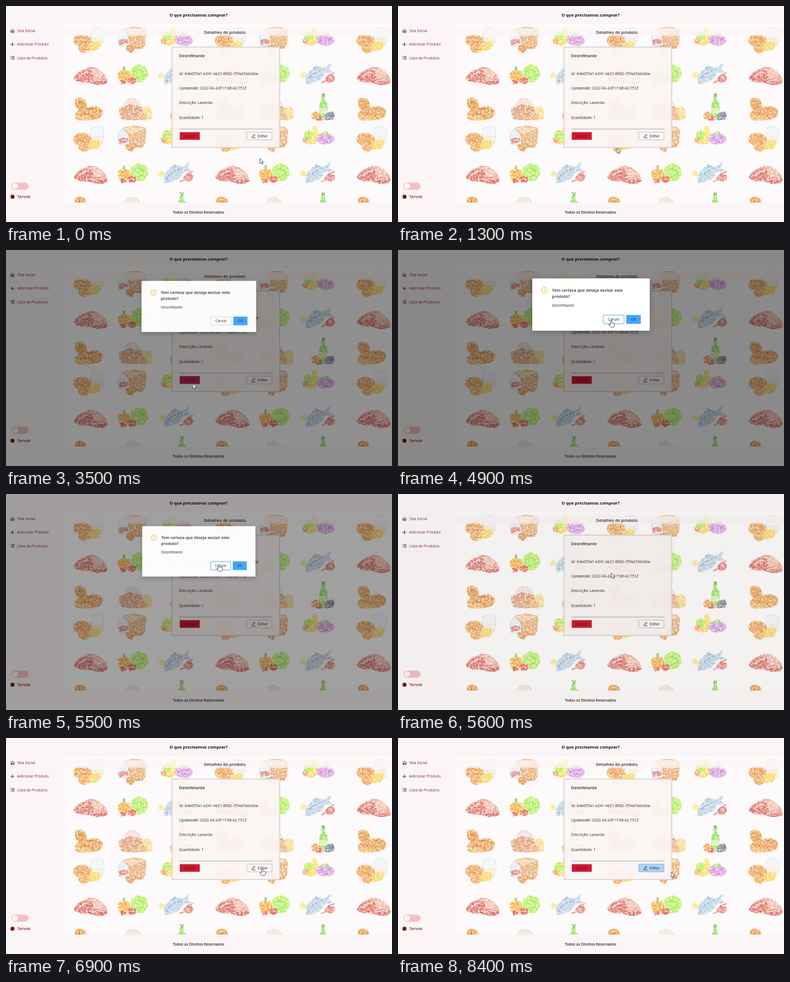
An HTML page that plays this animation: 690 by 388 pixels, repeating every 8500 ms.

```html
<!DOCTYPE html>
<html lang="pt">
<head>
<meta charset="utf-8">
<title>O que precisamos comprar?</title>
<style>
html, body { margin: 0; width: 100%; height: 100%; overflow: hidden; background: #fbf5f5; }
svg { display: block; width: 100vw; height: 100vh; }
text { font: 6.7px "Open Sans", "Noto Sans", sans-serif; fill: #2b2829; }
.semi { font-weight: 600; }
.title { font-size: 7.5px; }
.small { font-size: 6.6px; }
.side text { fill: #84283a; }
.line { fill: none; stroke: #222; stroke-width: .9; }

.cursor { animation: move 8.5s infinite; }
.arrow { animation: arrow 8.5s step-end infinite; }
.hand { animation: hand 8.5s step-end infinite; }
.beam { animation: beam 8.5s step-end infinite; }
.delete { animation: delete 8.5s linear infinite; }
.delete-text { animation: delete-text 8.5s linear infinite; }
.edit { animation: edit 8.5s linear infinite; }
.shade { animation: shade 8.5s step-end infinite; }
.modal { animation: modal 8.5s step-end infinite; transform-origin: 334px 237px; }
.cancel { animation: cancel 8.5s linear infinite; }
.flash { animation: flash 8.5s linear infinite; }

/* pointer: one step per 100 ms */
@keyframes move {
  0% { transform: translate(454px, 274px); animation-timing-function: step-end; }
  1.17% { transform: translate(454px, 274px); animation-timing-function: steps(5); }
  7.05% { transform: translate(430px, 266px); animation-timing-function: step-end; }
  9.41% { transform: translate(430px, 266px); animation-timing-function: steps(12); }
  23.52% { transform: translate(337px, 240px); animation-timing-function: step-end; }
  38.82%, 42.35% { transform: translate(334px, 240px); animation-timing-function: steps(7); }
  50.58% { transform: translate(381px, 127px); animation-timing-function: step-end; }
  65.88% { transform: translate(381px, 142px); animation-timing-function: step-end; }
  67.05% { transform: translate(380px, 163px); animation-timing-function: steps(12); }
  81.17% { transform: translate(458px, 235px); animation-timing-function: step-end; }
  96.47% { transform: translate(466px, 237px); animation-timing-function: step-end; }
  97.64% { transform: translate(478px, 240px); animation-timing-function: step-end; }
  98.82%, 100% { transform: translate(488.5px, 241px); animation-timing-function: step-end; }
}
@keyframes arrow {
  0%, 41.17%, 65.88%, 71.76%, 97.64%, 100% { opacity: 1; }
  23.52%, 50.58%, 67.05%, 81.17% { opacity: 0; }
}
@keyframes hand {
  0%, 41.17%, 65.88%, 97.64%, 100% { opacity: 0; }
  23.52%, 50.58%, 81.17% { opacity: 1; }
}
@keyframes beam {
  0%, 71.76%, 100% { opacity: 0; }
  67.05% { opacity: 1; }
}
@keyframes delete {
  0%, 23.52% { fill: #d0182f; stroke: #cdb4ba; }
  27.05%, 38.82% { fill: #6685c9; stroke: #5c9ad8; animation-timing-function: step-end; }
  41.17% { fill: #b8235a; stroke: #b8a2a8; animation-timing-function: step-end; }
  42.35%, 100% { fill: #d0182f; stroke: #cdb4ba; }
}
@keyframes delete-text {
  0%, 23.52%, 42.35%, 100% { fill: #680c1c; }
  27.05%, 38.82% { fill: #1e2438; }
}
@keyframes edit {
  0%, 81.17% { fill: #fbf7f7; stroke: #c4c1c6; }
  84.7%, 99.9% { fill: #acd3f6; stroke: #8fbbe4; }
  100% { fill: #fbf7f7; stroke: #c4c1c6; }
}
@keyframes shade {
  0%, 67.05%, 100% { opacity: 0; }
  41.17% { opacity: .43; }
  42.35% { opacity: .45; }
  64.7% { opacity: .36; }
  65.88% { opacity: .04; }
}
@keyframes modal {
  0%, 65.88%, 100% { opacity: 0; transform: none; }
  41.17% { opacity: .97; transform: scale(.976); }
  42.35% { opacity: 1; transform: none; }
  64.7% { opacity: .97; transform: scale(.964); }
}
@keyframes cancel {
  0%, 50.58% { stroke: #d9d9d9; }
  52.94%, 100% { stroke: #4a9fd0; }
}
@keyframes flash {
  0%, 65.87% { opacity: 0; }
  65.88%, 67.05% { opacity: .75; }
  74.11%, 100% { opacity: 0; }
}
</style>
</head>
<body>
<svg viewBox="0 0 690 388" preserveAspectRatio="none">
<defs>
  <clipPath id="page"><rect x="101" y="32" width="589" height="320.5"/></clipPath>
  <pattern id="hatch" width="2.4" height="9" patternUnits="userSpaceOnUse" patternTransform="rotate(38)">
    <path d="M.6 0V7M1.8 3V9" stroke="#fff" stroke-width=".5" opacity=".35"/>
  </pattern>
  <!-- pencil grain: wobble the edges, then knock out speckles -->
  <filter id="pencil" x="0" y="0" width="100%" height="100%" color-interpolation-filters="sRGB">
    <feTurbulence type="fractalNoise" baseFrequency=".3" numOctaves="2" seed="4" result="noise"/>
    <feDisplacementMap in="SourceGraphic" in2="noise" scale="2.5" xChannelSelector="R" yChannelSelector="G" result="drawn"/>
    <feColorMatrix in="noise" values="0 0 0 0 0  0 0 0 0 0  0 0 0 0 0  0 0 2.4 0 -1" result="grain"/>
    <feComposite in="drawn" in2="grain" operator="out"/>
  </filter>
  <filter id="drop" x="-20%" y="-20%" width="140%" height="150%">
    <feDropShadow dx="0" dy="3" stdDeviation="5" flood-opacity=".22"/>
  </filter>

  <g id="foods">
    <g transform="translate(0 -177.5)">
      <!-- bread, jug, cheese -->
      <path d="M153 219Q163 214 173 219 178 232 172 247 163 251 155 247 150 232 153 219Z" fill="#f1f5f9" stroke="#c9d9e6"/>
      <path d="M156 235Q164 232 173 234L172 246Q164 249 157 247Z" fill="#f6ead2"/>
      <path d="M120 240Q121 229 133 228 147 227 153 237 156 249 142 252 122 252 120 240Z" fill="#efa553"/>
      <path d="M126 234Q138 231 147 239M124 242Q136 238 146 247" fill="none" stroke="#d98237" stroke-width="1.4"/>
      <path d="M148 245Q160 238 169 243 172 252 162 257L146 259Z" fill="#fad556"/>
      <path d="M129 252Q138 245 148 252 150 260 140 262 130 261 129 252Z" fill="#f0a54c"/>
      <!-- loaf in a bag -->
      <path d="M200 238Q201 222 212 218L222 228 220 249 203 250Z" fill="#e4eef6" stroke="#bdd0df"/>
      <path d="M208 219Q230 212 247 218 254 224 250 234L249 248 222 251 218 230Z" fill="#e9ad72"/>
      <path d="M210 219Q230 214 247 221L223 230Z" fill="#f5cfa2"/>
      <path d="M201 240Q210 234 218 238L219 244 203 248Z" fill="#e5877a"/>
      <path d="M214 250Q224 243 232 250L247 248 245 254 230 255 225 262Q214 261 214 250Z" fill="#e39a50"/>
      <!-- fruit -->
      <path d="M299 215Q305 219 304 227 311 235 307 241 298 246 292 239 291 231 294 225 293 218 299 215Z" fill="#f9e658"/>
      <path d="M276 236Q288 244 304 240 303 247 291 249 277 247 276 236Z" fill="#f8d94e"/>
      <circle cx="288" cy="232" r="8.5" fill="#b5ec4a"/>
      <circle cx="282" cy="241" r="5" fill="#f19a66"/>
      <path d="M302 234Q311 226 322 229 335 232 334 242 328 250 315 249 300 246 302 234Z" fill="#dca0e2"/>
      <g fill="#cb83d4"><circle cx="310" cy="238" r="3"/><circle cx="319" cy="243" r="3"/><circle cx="326" cy="237" r="3"/></g>
      <path d="M311 229Q317 222 325 228L317 232Z" fill="#a6e064"/>
    </g>
    <!-- meat -->
    <path d="M121 130Q127 116 141 113 151 106 163 112 179 121 182 134 182 142 168 142L150 138Q128 140 121 130Z" fill="#eda58f"/>
    <path d="M121 130Q130 116 146 114 158 118 156 128 148 138 132 136 123 135 121 130Z" fill="#dc6f62"/>
    <path d="M152 117Q164 112 175 122 170 130 160 130Z" fill="#f3bfa8"/>
    <path d="M145 137Q157 126 181 134 182 142 163 142Z" fill="#d8685c"/>
    <path d="M130 128Q137 119 148 119M153 137Q164 130 176 135" fill="none" stroke="#f8dcd2" stroke-width="1.8"/>
    <!-- vegetables -->
    <path d="M224 121Q220 111 230 109 236 102 243 107 252 107 253 117 257 125 250 130 247 139 237 137 226 138 224 129 220 126 224 121Z" fill="#b3f25c"/>
    <path d="M229 118Q236 112 243 117 250 121 245 129M231 127Q237 132 243 125" fill="none" stroke="#8fe03e" stroke-width="1.8"/>
    <path d="M200 122Q201 114 209 117 216 113 221 118 225 127 219 135 211 141 204 136 199 130 200 122Z" fill="#fbb43c"/>
    <path d="M208 119V135M215 119L214 134" stroke="#e8892f" stroke-width="1.4"/>
    <path d="M208 118L209 109 213 108 213 118Z" fill="#8fc85a"/>
    <ellipse cx="225" cy="134" rx="8" ry="6" fill="#e8604f"/>
    <path d="M204 134Q211 130 215 139L206 141Z" fill="#e8594a"/>
    <!-- fish, lemon, crab -->
    <circle cx="278" cy="124" r="5.5" fill="#f8ea7c"/>
    <path d="M283 141Q279 124 294 114 305 107 317 111L327 102Q328 108 324 113 328 117 333 118 324 122 318 119 311 139 283 141Z" fill="#b9d0e3"/>
    <path d="M286 136Q292 120 313 115" fill="none" stroke="#86a8c4" stroke-width="1.6"/>
    <path d="M283 141Q293 140 305 132L300 139Z" fill="#e6eef4"/>
    <path d="M293 114L302 106 307 111Z" fill="#9fbdd5"/>
    <path d="M316 131Q322 122 332 124 338 130 332 136 321 141 316 131Z" fill="#e88379"/>
    <path d="M310 138L324 132M322 125L334 120" stroke="#e07468" stroke-width="2"/>
    <!-- roast chicken -->
    <path d="M131 189Q120 177 124 168 131 162 141 168 147 178 143 187Z" fill="#e8993f"/>
    <path d="M123 194Q128 184 146 182 166 176 173 188 175 201 160 204 135 208 124 203Z" fill="#eba050"/>
    <path d="M128 172Q137 176 138 185M146 186Q160 180 169 190M131 197Q144 189 157 198" fill="none" stroke="#cb7a2c" stroke-width="1.8"/>
    <path d="M123 198Q130 193 138 199 146 194 153 201 151 206 136 206 123 206 123 198Z" fill="#f2b860"/>
    <!-- basket -->
    <path d="M211 181Q214 165 226 166 238 167 241 180Z" fill="#f1e0d4" stroke="#e2c8b4"/>
    <path d="M202 184Q220 174 243 181 247 193 241 204 221 207 206 203 201 193 202 184Z" fill="#e2a476"/>
    <path d="M205 188Q224 182 243 188M205 196Q224 191 243 196" fill="none" stroke="#c9855a" stroke-width="1.4"/>
    <path d="M213 182Q220 172 231 180Z" fill="#e78a74"/>
    <path d="M244 184Q253 176 260 185L261 202Q252 208 245 204Z" fill="#f6db86"/>
    <path d="M235 196Q244 188 251 196L249 205H237Z" fill="#efb070"/>
    <!-- bottle -->
    <path d="M311 157H317V169Q322 174 322 181V204H307V181Q307 174 311 169Z" fill="#8fe05a"/>
    <path d="M308 183H321V194H308Z" fill="#d6f0a0"/>
    <path d="M311 157H317V163H311Z" fill="#6cb84a"/>
    <circle cx="300" cy="197" r="7.5" fill="#f5a550"/>
    <path d="M318 197Q322 188 331 190 337 196 332 203 325 207 318 204Z" fill="#7b7b94"/>
    <path d="M302 200Q308 194 315 200L311 206H303Z" fill="#e26a58"/>
  </g>
</defs>

<rect width="690" height="388" fill="#fbf5f5"/>
<rect x="101" y="32" width="589" height="320.5" fill="#fcfafa"/>
<rect class="flash" width="690" height="388" fill="#fffbfb" opacity="0"/>
<g clip-path="url(#page)">
  <g filter="url(#pencil)">
    <use href="#foods"/>
    <use href="#foods" x="253"/>
    <use href="#foods" x="506"/>
    <use href="#foods" y="177.5"/>
    <use href="#foods" x="253" y="177.5"/>
    <use href="#foods" x="506" y="177.5"/>
  </g>
  <rect x="101" y="32" width="589" height="321" fill="url(#hatch)"/>
</g>
<rect x="107" y="40" width="583" height="13.5" fill="#fbf4f4" opacity=".75"/>

<text class="title" x="292.3" y="19" style="font-weight:700;fill:#111">O que precisamos comprar?</text>
<text class="title semi" x="354" y="50">Detalhes do produto</text>
<text class="semi" x="298.3" y="373" style="font-size:6.55px">Todos os Direitos Reservados</text>

<g class="side">
  <path class="line" d="M7.8 45L11.5 41.3 15.2 45M9 44V47.8H10.6V45.4H12.4V47.8H14V44M8 69H15M11.5 65.5V72.5M10 90.6H15.2M10 93H15.2M10 95.4H15.2M7.8 90.6H8.8M7.8 93H8.8M7.8 95.4H8.8"/>
  <text x="20" y="47">Tela Inicial</text>
  <text x="20" y="71.4">Adicionar Produto</text>
  <text x="20" y="95.5">Lista de Produtos</text>
  <rect x="10" y="317.3" width="30.5" height="12.6" rx="6.3" fill="#f6bfc3"/>
  <circle cx="16.5" cy="323.6" r="5.4" fill="#fdf6f6" stroke="#d9b9bc" stroke-width=".4"/>
  <circle cx="11.6" cy="342.7" r="3.6" fill="#7b1527"/>
  <text class="semi" x="20" y="345.2" style="font-size:7.4px">Tarvok</text>
</g>

<!-- product card -->
<rect x="296.7" y="73.7" width="192.6" height="180.6" fill="#fbf5f4" fill-opacity=".94" stroke="#d3cccf" stroke-width="1.4"/>
<text class="semi" x="309.6" y="92.2" style="font-size:7.4px">Desinfetante</text>
<text x="309.6" y="124" style="font-size:6.8px">Id: b4ed55a1-e241-4e21-8962-1f54a7decbba</text>
<text x="309.6" y="150" style="font-size:6.75px">UpdatedAt: 2022-04-24T17:08:42.751Z</text>
<text class="small" x="309.6" y="176.4">Descrição: Lavanda</text>
<text class="small" x="309.6" y="202.6">Quantidade: 1</text>
<path d="M309.5 221H476" stroke="#a9a4a6"/>
<rect class="delete" x="310.5" y="226.5" width="36" height="14" fill="#d0182f" stroke="#cdb4ba"/>
<text class="delete-text small" x="318.2" y="236.2">Excluir</text>
<rect class="edit" x="430.5" y="226.5" width="45" height="14" fill="#fbf7f7" stroke="#c4c1c6"/>
<path class="line" d="M440 235.2L440.3 233.6 443.9 230 445.2 231.3 441.6 234.9ZM439.2 237H446" style="stroke-width:.8"/>
<text class="small" x="449.8" y="236.2">Editar</text>

<rect class="shade" width="690" height="388" opacity="0"/>

<!-- confirmation -->
<g class="modal" opacity="0">
  <rect x="240" y="51" width="210" height="94" rx=".8" fill="#fff" filter="url(#drop)"/>
  <circle cx="261.8" cy="72.3" r="5.1" fill="none" stroke="#efb13a"/>
  <path d="M261.8 69.4V73.2M261.8 74.3V75.4" stroke="#efb13a"/>
  <text class="semi" x="275.3" y="75" style="font-size:7.45px">Tem certeza que deseja excluir este</text>
  <text class="semi" x="275.3" y="86.4" style="font-size:7.45px">produto?</text>
  <text class="small" x="275.3" y="101.6">Desinfetante</text>
  <rect class="cancel" x="367" y="117" width="37" height="15.5" rx=".8" fill="#fff" stroke="#d9d9d9" stroke-width=".9"/>
  <text class="small" x="385.5" y="127.2" text-anchor="middle">Cancel</text>
  <rect x="408" y="116.7" width="26" height="16" rx=".8" fill="#43a5f8"/>
  <text class="small" x="421" y="127.2" text-anchor="middle" style="fill:#16415f">OK</text>
</g>

<g class="cursor" fill="#fff" stroke="#333" stroke-width=".8" stroke-linejoin="round">
  <path class="arrow" d="M0 0V9L2.1 7.2 3.6 10.3 5 9.6 3.6 6.7H6.4Z"/>
  <path class="hand" opacity="0" d="M-1.2 .8Q0-.6 1.2 .8V4.2L5 5Q6.3 5.3 6.2 6.6L5.6 9.6Q5 12 3 12H.6Q-.6 12-1.4 10.8L-4 7.2Q-4.2 5.6-2.6 6L-1.2 7.2Z"/>
  <path class="beam" opacity="0" fill="none" d="M-1.8-4H1.8M0-4V4M-1.8 4H1.8"/>
</g>
</svg>
</body>
</html>
```
